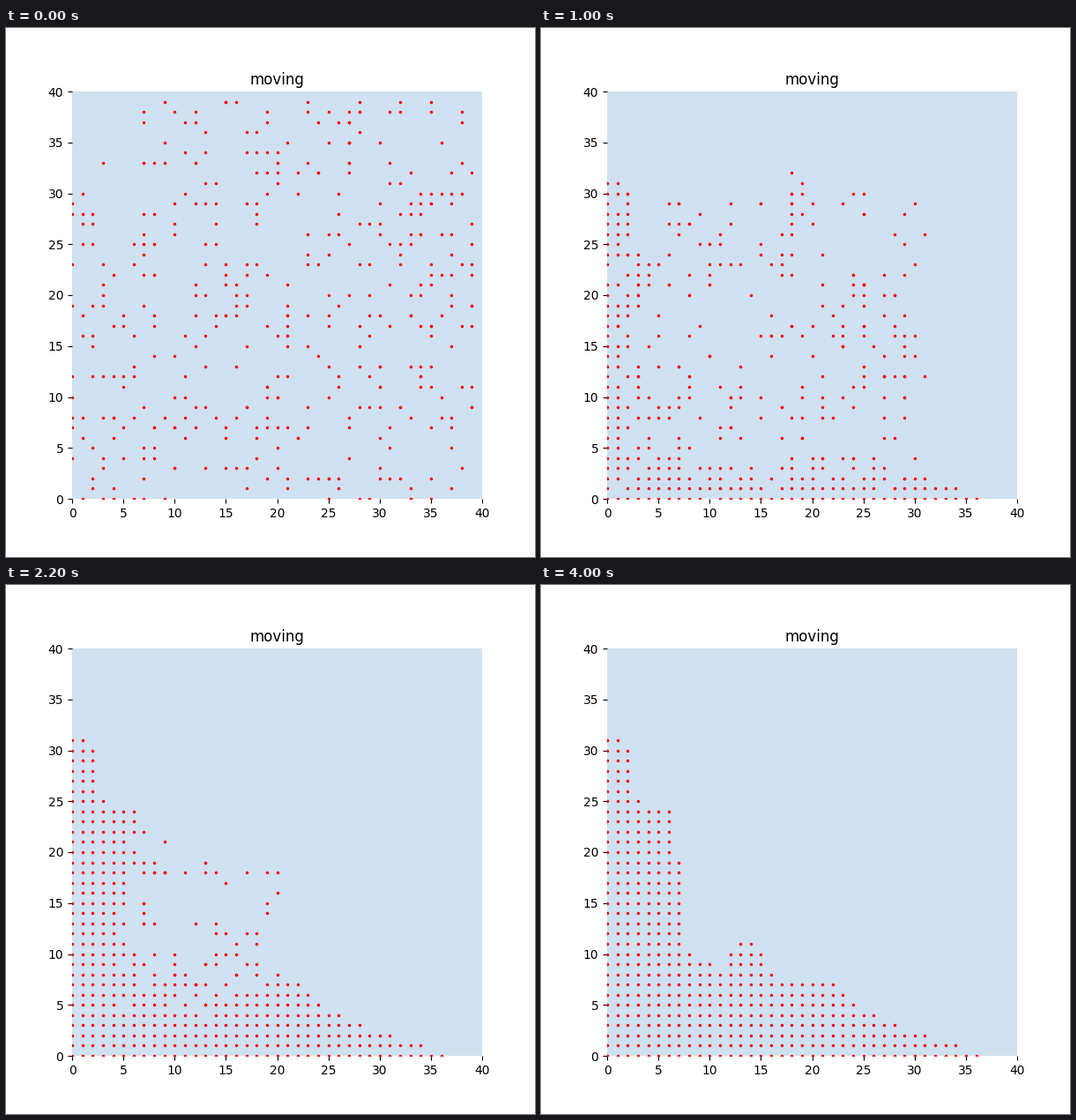
Recreate the animation shown at these times as a matplotlib script. Size 600 px wide and 600 px high, loop 4100 ms.

```python
import random

import matplotlib.pyplot as plt
import numpy as np
from matplotlib.animation import FuncAnimation

SIZE = 40
FRAMES = 41

# Key points (column, top row) along the outline of the final pile
OUTLINE = [(0, 31), (1, 31), (2, 30), (3, 25), (4, 24), (6, 24), (7, 19),
           (8, 10), (11, 8), (13, 11), (14, 11), (16, 8), (17, 7), (22, 7),
           (26, 3.6), (30, 2), (36, 0)]

# Moves away from the corner and their odds; time runs backwards here
MOVES = [(1, 1), (1, 0), (0, 1), (0, 0)]
ODDS = [0.79, 0.08, 0.08, 0.05]

rng = random.Random(12)


def trail(cell, reach):
    """Path from a resting cell back out to a starting place."""
    x, y = cell
    goal = x + y + 2 * reach
    path = [cell]
    while x + y < goal and max(x, y) < SIZE - 1 and len(path) < FRAMES:
        dx, dy = rng.choices(MOVES, ODDS)[0]
        x, y = x + dx, y + dy
        path.append((x, y))
    return path


def make_trails():
    """Fill each diagonal of the pile from random dots on that diagonal."""
    columns, tops = zip(*OUTLINE)
    diagonals = {}
    for x in range(columns[-1] + 1):
        top = round(float(np.interp(x, columns, tops)))
        for y in range(top + 1):
            diagonals.setdefault(x - y, []).append((x, y))
    trails = []
    for d, cells in sorted(diagonals.items()):
        starts = sorted(rng.sample(range(SIZE - abs(d)), len(cells)))
        for cell, start in zip(cells, starts):
            trails.append(trail(cell, max(0, start - min(cell))))
    return trails


trails = make_trails()

fig, ax = plt.subplots(figsize=(6, 6), dpi=100)
ax.set_facecolor("#d0e1f2")
ax.set_xlim(0, SIZE)
ax.set_ylim(0, SIZE)
ax.set_title("moving")
for spine in ax.spines.values():
    spine.set_visible(False)
dots, = ax.plot([], [], "r.", markersize=3)


def update(t):
    dots.set_data(*zip(*(path[max(len(path) - 1 - t, 0)] for path in trails)))
    return dots,


anim = FuncAnimation(fig, update, frames=FRAMES, interval=100,
                     repeat=True, repeat_delay=0)
plt.show()
```
